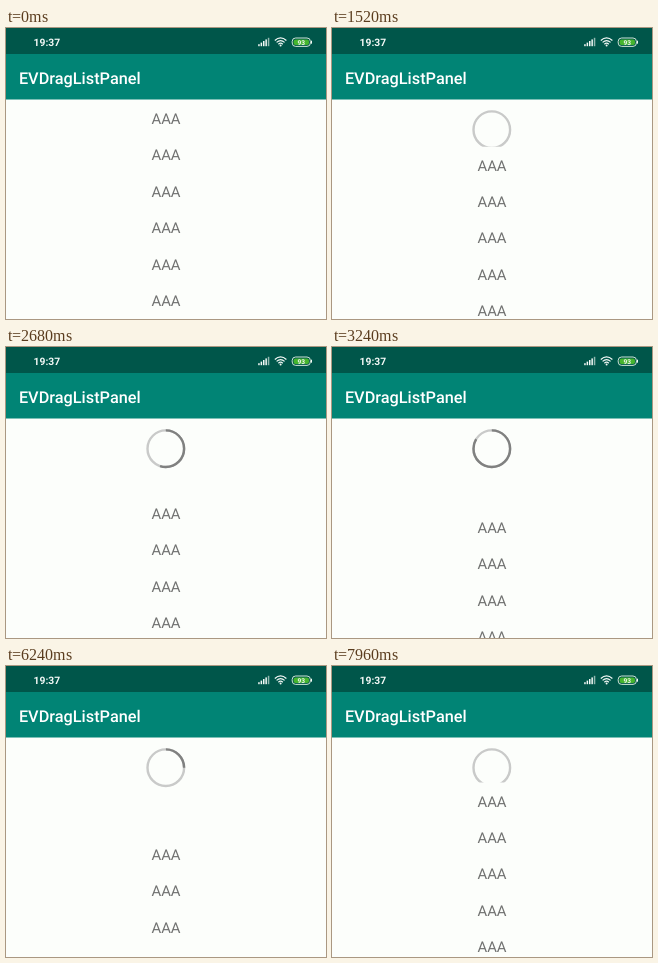
An HTML page that plays this animation: 320 px wide and 291 px high, repeating every 8000 ms.

```html
<!DOCTYPE html>
<html lang="en">
<head>
<meta charset="utf-8">
<title>Pull to refresh</title>
<style>
  html, body { margin: 0; width: 100%; height: 100%; overflow: hidden; background: #fcfefb; }
  svg { display: block; width: 100%; height: 100%; font-family: Roboto, "Open Sans", sans-serif; }
  text { text-rendering: geometricPrecision; }
</style>
</head>
<body>
<svg viewBox="0 0 320 291" xmlns="http://www.w3.org/2000/svg">
  <defs>
    <clipPath id="gap"><rect id="gapBox" y="72" width="320" height="0"/></clipPath>
  </defs>
  <rect width="320" height="291" fill="#fcfefb"/>

  <g clip-path="url(#gap)">
    <g fill="none" stroke-width="2.4" transform="translate(159.8 101.7) rotate(-90)">
      <circle r="18.3" stroke="#c9cac9"/>
      <circle id="arc" r="18.3" stroke="#808180" pathLength="360"/>
    </g>
  </g>
  <g id="list" font-size="14.9" fill="#707170" text-anchor="middle"></g>

  <rect y="26" width="320" height="45.5" fill="#018475"/>
  <rect width="320" height="26" fill="#00564a"/>
  <text x="12.9" y="55.5" font-size="16.3" font-weight="500" fill="#fff">EVDragListPanel</text>

  <g fill="#f2f8f6">
    <text x="27.6" y="17.8" font-size="10.3" font-weight="700">19:37</text>
    <g id="bars"></g>
    <g fill="none" stroke="#f2f8f6" stroke-width="1.2">
      <path d="M268.8 12.5Q274.6 7.4 280.4 12.5"/>
      <path d="M270.6 14.4Q274.6 10.8 278.6 14.4"/>
      <path d="M272.4 16.2Q274.6 14.2 276.8 16.2"/>
    </g>
    <circle cx="274.6" cy="17.6" r="1"/>
    <rect x="286.2" y="10" width="18.2" height="8.4" rx="3.4" fill="#00564a" stroke="#e4f3e4" stroke-width=".9"/>
    <rect x="287.6" y="11.4" width="15.4" height="5.6" rx="2" fill="#45b52e"/>
    <rect x="305" y="12.6" width="1" height="3.2" rx=".5"/>
    <text x="295.3" y="16.6" font-size="6.6" font-weight="700" text-anchor="middle">93</text>
  </g>
</svg>
<script>
const LOOP = 8000, OPEN = 98, ROW = 36.4;
const SPIN_FROM = 3820, SPIN_TO = 6350, CLOSE_MS = 1000, TURN_MS = 1157;
const PULL = [[700, 0], [1000, 28], [1300, 41], [2120, 62], [3240, 90], [3600, OPEN]];
const PULL_AGAIN = [[7500, 0], [7960, 44.5], [8000, 48]];

const $ = id => document.getElementById(id);
const clamp = x => Math.min(1, Math.max(0, x));

function add(parent, tag, attrs, text = "") {
  const el = document.createElementNS("http://www.w3.org/2000/svg", tag);
  for (const k in attrs) el.setAttribute(k, attrs[k]);
  el.textContent = text;
  parent.append(el);
}

for (let i = 0; i < 6; i++) add($("list"), "text", { x: 160, y: 96 + i * ROW }, "AAA");
for (let i = 0; i < 5; i++) {
  const h = 2 + i * 1.6;
  add($("bars"), "rect", { x: 252.2 + i * 2.4, y: 18.2 - h, width: 1.5, height: h, opacity: i > 3 ? 0.6 : 1 });
}

function along(keys, t) {
  if (t <= keys[0][0]) return keys[0][1];
  for (let i = 1; i < keys.length; i++) {
    const [t0, a] = keys[i - 1], [t1, b] = keys[i];
    if (t <= t1) return a + (b - a) * (t - t0) / (t1 - t0);
  }
  return keys[keys.length - 1][1];
}

function offsetAt(t) {
  if (t < SPIN_TO) return along(PULL, t);
  const p = clamp((t - SPIN_TO) / CLOSE_MS);
  return p < 1 ? OPEN * (1 + Math.cos(p * Math.PI)) / 2 : along(PULL_AGAIN, t);
}

function draw(t) {
  const y = offsetAt(t);
  const spinning = t >= SPIN_FROM && t < SPIN_TO;
  // The ring fills over the second half of the pull.
  const sweep = spinning ? 90 : 360 * clamp(2 * y / OPEN - 1);
  const turn = spinning ? 160 + (t - 4440) / TURN_MS * 360 : 0;

  $("list").setAttribute("transform", `translate(0 ${y.toFixed(2)})`);
  $("gapBox").setAttribute("height", y.toFixed(2));
  const arc = $("arc");
  arc.setAttribute("visibility", sweep > 0 ? "visible" : "hidden");
  arc.setAttribute("stroke-dasharray", sweep >= 360 ? "none" : `${sweep.toFixed(2)} 360`);
  arc.setAttribute("transform", `rotate(${turn.toFixed(2)})`);
}

const start = performance.now();
function tick() {
  draw((performance.now() - start) % LOOP);
  requestAnimationFrame(tick);
}
tick();
</script>
</body>
</html>
```
